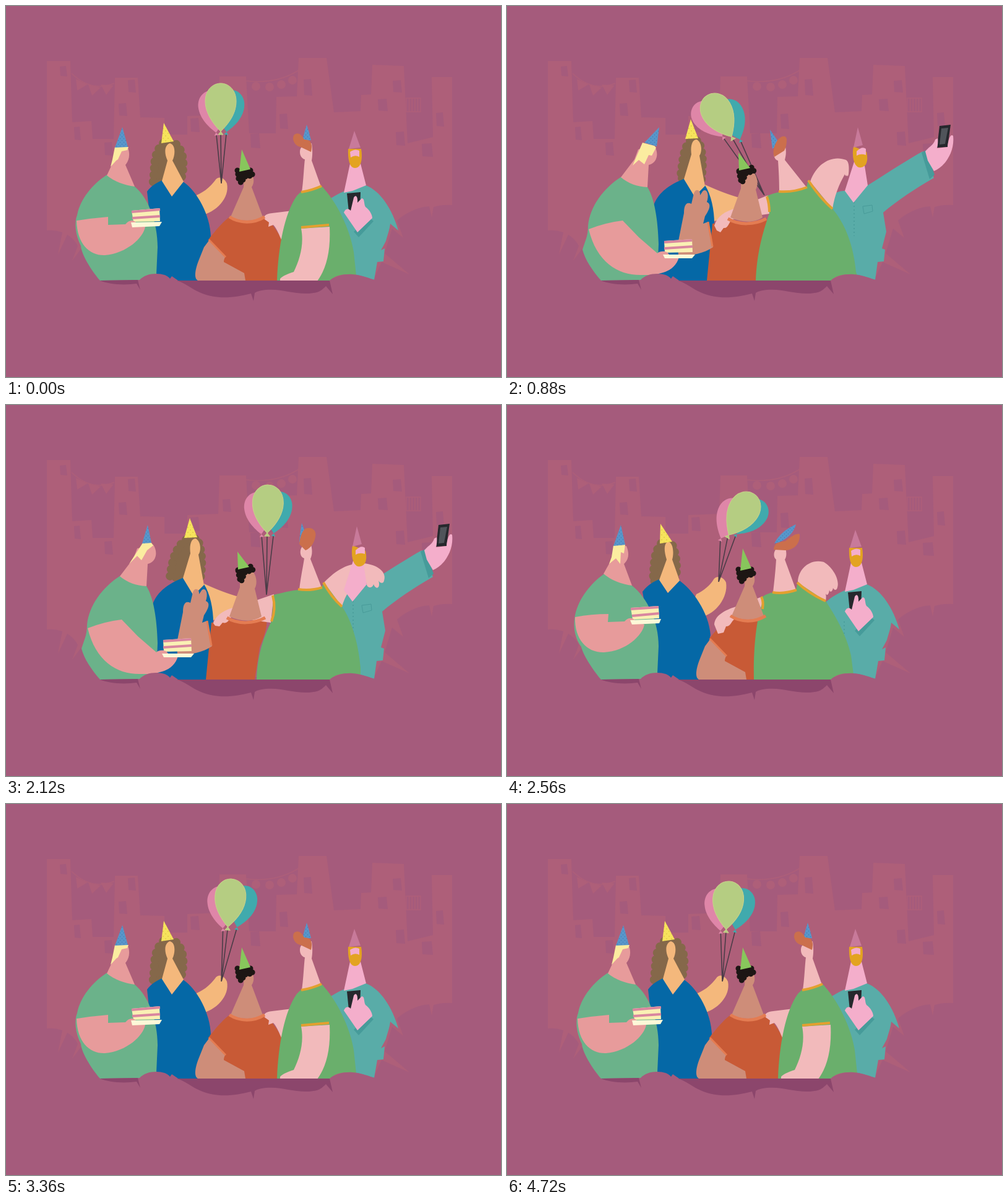
Write an HTML page that moves like this. It is 800x600 px and loops after 4760 ms.

```html
<!DOCTYPE html>
<html lang="en">
<head>
<meta charset="utf-8">
<title>Party selfie</title>
<style>
html,body{margin:0;width:100%;height:100%;overflow:hidden;background:#a55b7c}
svg{display:block;width:100%;height:100%}
</style>
</head>
<body>
<svg id="stage" viewBox="0 0 800 600">
<defs>
<pattern id="blueDots" width="6" height="6" patternUnits="userSpaceOnUse"><rect width="6" height="6" fill="#5896ca"/><circle cx="1.5" cy="1.5" r=".7" fill="#3c78b2"/><circle cx="4.5" cy="4.5" r=".7" fill="#3c78b2"/></pattern>
<pattern id="goldDots" width="8" height="8" patternUnits="userSpaceOnUse"><rect width="8" height="8" fill="#f6e35c"/><circle cx="2" cy="2" r=".8" fill="#d8b93c"/><circle cx="6" cy="6" r=".8" fill="#d8b93c"/></pattern>
</defs>
<rect width="800" height="600" fill="#a55b7c"/>
<g id="city"></g>
<g id="cast"></g>
<path fill="#a55b7c" d="M216 444C222 436 232 433 243 433C255 433 262 437 265 441L268 437L279 444.5L523 445C535 435 550 433 560 434C575 435 588 441 596 443L596 480L216 480Z"/>
<path fill="#8c466c" d="M152 444L213 443L217 459L211 449C190 452 165 450 152 444ZM276 444L523 444L528 466L517 453C510 460 505 465 485 465C460 465 445 457 420 459C410 460 405 462 402 464L400 477L396 465C370 472 340 475 315 464C300 458 290 448 276 444Z"/>
</svg>
<script>
const LOOP = 4760, STEP = 40;
const BG = '#a55b7c', WALL = '#ae5f79';
const $ = id => document.getElementById(id);

function add(parent, tag, attrs) {
  const el = document.createElementNS('http://www.w3.org/2000/svg', tag);
  for (const k in attrs) el.setAttribute(k, attrs[k]);
  return parent.appendChild(el);
}

function drawCity() {
  const g = $('city');
  add(g, 'path', {fill: WALL, d: 'M66 89L104 89L107 188L138 186L140 215L174 215L176 116L213 116L217 180L256 181L256 208L293 208L293 178L343 176L345 114L388 114L393 206L436 206L437 147L470 146L473 84L518 84L530 172L573 170L574 144L590 143L592 95L643 97L649 222L690 212L688 115L721 115L721 322C710 321 700 322 691 325L688 342L684 324C665 325 645 335 632 347L642 375L624 360L612 400L652 434L607 414L595 440L150 440L121 393L107 412L116 388C112 380 105 373 99 370L84 402L91 366C82 363 75 362 66 363Z'});
  const windows = [[87,97,12,17],[197,119,13,21],[182,157,14,21],[110,195,11,22],[159,220,14,22],
    [298,181,15,23],[350,152,14,21],[395,206,16,24],[442,174,14,25],[481,118,14,27],
    [601,150,16,20],[625,120,15,20],[630,203,15,23],[695,172,13,23],[672,222,18,22]];
  for (const [x, y, w, h] of windows)
    add(g, 'path', {fill: BG, d: `M${x} ${y + 1}l${w - 2} -1l2 ${h}l${-w + 1} -1Z`});
  const line = {fill: 'none', stroke: WALL, 'stroke-width': 1.5};
  add(g, 'path', {...line, d: 'M106 109Q138 140 175 125M388 121Q436 127 473 104'});
  for (const [x, y, r] of [[113,118,12],[133,127,0],[153,127,-10]])
    add(g, 'path', {fill: WALL, d: `M${x} ${y}l20 5l-14 13Z`, transform: `rotate(${r} ${x} ${y})`});
  for (const [x, y] of [[404,130],[426,131],[445,127],[463,120]])
    add(g, 'circle', {cx: x, cy: y, r: 7, fill: WALL});
  let rails = 'M646 149H671M646 171H671';
  for (let x = 647; x < 672; x += 4.6) rails += `M${x} 149V171`;
  add(g, 'path', {...line, d: rails});
}

const trim = (c, w) => ({stroke: c, 'stroke-width': w});
const curls = (c, w, gap) => ({...trim(c, w), 'stroke-linecap': 'round', 'stroke-linejoin': 'round', 'stroke-dasharray': `0 ${gap}`});
const GOLD = trim('#e3a02f', 4), RUST = '#e47c52', PINK = '#f4aecb';

// A pose is a letter, or a blend from A (0) to B (1).
const leanKeys = [[0,0],[80,0],[220,'D'],[540,1.07],[880,'C'],[1280,1],[2200,1],[2500,'D'],[2600,'D'],[2960,0],[LOOP,0]];
const brownKeys = [[0,0],[220,0],[560,1],[2200,1],[2500,0],[LOOP,0]];
const beardKeys = [[0,0],[180,0],[540,1],[2200,1],[2500,0],[LOOP,0]];
const greenKeys = [[0,'A'],[200,'A'],[600,'C'],[900,'C'],[1320,'B'],[2200,'B'],[2520,'D'],[2620,'D'],[3080,'A'],[LOOP,'A']];

// Each part: fill, poses, extra attributes.
const shirt = [
  ['#59aca8', {A:'M516 318C530 306 545 300 551 298L581 290C605 298 625 330 634 363L621 352C620 362 616 372 614 380L612 384L606 395L612 392L610 413L600 414L595 443C570 434 560 434 550 434L525 360Z',
    B:'M526 305C534 300 540 299 546 299L583 290C615 270 645 250 672 235L690 278C660 295 630 315 608 334L613 365L606 392L611 394L609 413L599 414L595 443C570 434 560 434 550 434L526 345Z'}],
  ['none', {A:'M545 350L545 390', B:'M561 317L561 372'}, {...trim('#3f918f', 1), 'stroke-dasharray': '2 4'}],
  ['none', {A:'M546 380L546 380L546 380L546 380Z', B:'M575 324L590 322L591 332L577 336Z'}, trim('#489b99', 1)]
];
const girl = [
  ['#f4b87c', {A:'M308 306C322 300 332 290 338 282C342 275 352 276 357 287C362 310 340 334 314 339L300 320Z',
    B:'M320 289C335 296 350 302 372 309C384 310 388 318 384 330C375 345 350 345 334 348L318 320Z',
    D:'M306 306C318 300 328 292 334 282C338 276 349 276 354 287C358 312 336 338 316 342L300 320Z'}],
  ...['', 1].map(dotted => ['#85684a', {A:'M254 222C236 240 242 260 237 290L252 284L284 276C290 250 284 230 274 223Z',
    B:'M291 218C273 230 268 255 265 278L288 280L314 282C318 255 317 235 309 216Z',
    C:'M296 218C283 232 284 260 280 278L290 280L314 282C317 255 317 240 310 218Z',
    D:'M249 224C236 240 238 262 236 285L250 284L273 280C276 255 272 236 266 224Z'}, dotted ? curls('#85684a', 14, 11) : {}]),
  ['#0568a6', {A:'M243 440L228 300C235 290 245 285 252 282L268 308L286 284C310 300 330 340 331 372L310 444L262 444Z',
    B:'M240 440L237 322C245 300 265 288 287 279L303 308L320 290C330 305 335 330 335 352L325 444L262 444Z',
    D:'M243 440L219 302C228 290 238 285 246 282L260 304L276 282C300 298 326 335 329 372L310 444L262 444Z'}],
  ['#f4b87c', {A:'M252 283L261 250C254 234 258 224 265 222C274 224 274 240 269 250L287 284L268 308Z',
    B:'M286 280L298 240C296 225 300 215 307 216C316 222 315 237 311 242L320 291L303 308Z',
    D:'M246 283L258 250C253 234 254 224 260 221C269 222 270 240 267 250L279 284L260 304Z'}],
  ['url(#goldDots)', {A:'M255 189L251 222L271 219Z', B:'M297 183L288 215L309 214Z', D:'M248 192L247 224L267 221Z'}]
];
const brownBody = [
  ['#c85a36', {A:'M327 378C345 355 355 345 362 341C380 350 400 350 417 341C430 350 442 370 446 378L442 444L340 444Z',
    B:'M332 352C345 350 350 347 357 345C375 354 400 352 417 343C428 348 415 380 410 392L402 444L323 444Z'}],
  ['#ce8d79', {A:'M329 378L355 405C353 408 352 410 352 414L385 432L387 444C380 444 370 444 360 444L350 444C345 444 340 444 335 444L325 444C318 444 314 444 310 444C303 440 306 425 312 410L320 390Z',
    B:'M325 349L333 390C318 400 300 404 277 404L276 385L286 335C286 322 290 316 298 320L302 303C304 295 313 296 312 306L316 300C321 294 328 302 323 317C331 320 327 330 320 340L317 352Z'}],
  ['none', {A:'M328 378L355 406', B:'M325 349L332 389'}, trim(RUST, 3)]
];
const green = [
  ['#f2babb', {A:'M463 331L430 335C420 336 415 340 418 345L425 350L424 357L432 354C438 360 442 372 446 380L452 350Z',
    B:'M433 306L372 327C352 330 338 342 335 353L338 357L345 358L350 352C358 354 360 348 364 343L428 352Z',
    C:'M422 306L370 327C352 332 340 340 335 355L339 363L345 366L350 359C358 360 358 350 364 345L424 336Z',
    D:'M412 310L370 326C352 332 336 340 335 355L341 370L350 368L354 358C362 358 362 350 368 346L413 330Z'}],
  ['#6aaf6c', {A:'M438 444C440 390 450 335 470 307L474 303C475 302 476 301 478 300L509 291L512 293L516 298C535 320 556 360 562 398L566 436C550 433 535 433 523 444Z',
    B:'M405 444C406 405 416 375 429 350L433 307C445 304 460 300 473 299L510 295L514 286L543 326C560 350 570 390 573 425L573 436C550 433 535 433 523 444Z',
    C:'M402 444C404 400 412 370 424 335L420 307C428 304 434 302 440 301L484 293L487 281L526 328C545 350 560 385 564 430L566 436C550 433 535 433 523 444Z',
    D:'M399 444C398 400 402 350 412 322L413 310C419 306 424 304 430 303L467 299L470 286L515 317C530 340 548 370 556 405L560 436C550 433 535 433 523 444Z'}],
  ['#f2babb', {A:'M523 357C525 395 518 425 503 445C490 445 470 446 443 445C443 444 443 443 443 442C443 441 443 441 444 440C446 438 452 434 465 430C475 410 482 385 477 360Z',
    B:'M514 287C535 265 555 255 578 256C600 258 616 270 611 284C610 290 604 288 602 284C606 296 598 300 594 290C592 298 582 296 583 288C570 284 552 295 543 326Z',
    C:'M490 284C500 255 525 240 548 249C553 252 553 262 552 272C551 276 550 276 549 273C549 276 548 276 547 273C547 275 546 274 546 272C536 290 530 305 526 328Z',
    D:'M470 287C470 265 490 248 512 254C526 262 538 282 534 295C533 300 529 300 527 296C526 302 522 304 521 299C520 308 516 310 514 302C516 306 516 312 515 317Z'}],
  ['#f2babb', {A:'M478 301C481 280 481 265 483 248C474 246 473 232 478 228L494 222C496 235 495 244 494 250L509 292Q495 297 478 301Z',
    B:'M474 299C476 280 480 262 482 248C474 246 474 232 480 228L493 226C496 238 494 244 492 249L510 295Q492 300 474 299Z',
    C:'M440 300C440 280 439 265 438 250C430 248 430 235 434 232L450 228C452 238 450 244 449 249L484 293Q462 301 440 300Z',
    D:'M430 303C432 285 434 268 435 250C430 246 431 238 434 234L450 230C452 240 452 245 449 250L467 299Q450 306 430 303Z'}],
  ['none', {A:'M477 301Q495 298 510 291', B:'M472 298Q492 301 511 295', C:'M439 300Q462 302 485 293', D:'M429 303Q448 306 468 299'}, GOLD],
  ['none', {A:'M477 358Q500 356 522 354', B:'M513 287Q525 310 543 326', C:'M487 282Q505 310 526 328', D:'M469 287Q488 305 515 317'}, GOLD],
  ['none', {A:'M472 306Q472 306 472 306', B:'M431 308Q437 330 429 350', C:'M420 308Q424 320 424 333', D:'M411 310Q415 318 413 330'}, GOLD],
  ['url(#blueDots)', {A:'M486 192Q482 205 479 217L493 217Q490 204 486 192Z', B:'M478 191Q475 207 474 222L486 214Q482 202 478 191Z',
    C:'M425 200Q427 216 429 231L440 222Q433 211 425 200Z', D:'M467 193Q442 204 432 224L440 222Q462 212 467 193Z'}],
  ['#cb6f4c', {A:'M476 228C466 226 461 214 466 208C474 202 480 212 482 216C493 215 496 224 493 236Z',
    B:'M474 225C476 210 480 199 488 199C498 198 502 206 500 213C498 224 492 232 484 235Z',
    C:'M432 244C428 235 433 222 438 216C445 208 452 210 452 216C452 225 450 230 448 234Z',
    D:'M431 234C432 222 440 222 450 220C460 212 468 207 473 209C474 220 468 234 450 235Z'}]
];
const brownHead = [
  ['#ce8d79', {A:'M385 273L384 293L363 341C380 349 400 349 415 341L397 293C402 286 401 276 396 271Z',
    B:'M378 272L378 295L361 342C380 351 400 351 413 342L402 297C407 288 405 274 396 266Z'}],
  ['none', {A:'M361 341C378 352 400 352 418 341', B:'M357 344C375 355 400 354 419 344'}, trim(RUST, 5)],
  ...['', 1].map(dotted => ['#1d1614', {A:'M374 266L395 266L399 274L386 276L380 286L376 280Z',
    B:'M375 267L396 261L399 267L386 271L380 286L377 280Z'}, dotted ? curls('#1d1614', 9, 7) : {}]),
  ['#88c65c', {A:'M381 232L377 268L395 264Z', B:'M374 237L375 266L393 262Z'}]
];
const beardFront = [
  ['#469b9a', {A:'M562 365L570 374L594 348L586 342Z', B:'M670 237L678 233L691 273L683 280Z'}],
  ['#26282d', {A:'M551 303L573 301L572 330L554 333Z', B:'M699 194L717 192L712 228L695 229Z'}],
  ['#50545a', {A:'M562 316L562 316L562 316L562 316Z', B:'M702 198L713 197L708 223L699 224Z'}],
  [PINK, {A:'M546 334C548 328 553 326 557 331L562 310C565 304 569 308 568 318L575 311C580 311 578 320 581 325C588 330 592 338 592 343L568 366Z',
    B:'M676 235C684 226 690 224 692 216L696 214C697 220 696 226 695 230L712 228C713 215 717 206 721 210C724 235 708 260 690 267L680 250Z'}],
  [PINK, {A:'M556 232L556 255L546 302L560 299L582 290L573 255L573 232Z', B:'M562 230L561 252L546 299L560 318L583 290L577 252L578 232Z'}],
  ['#e3a321', {A:'M553 231C552 250 556 262 564 262C573 262 577 250 574 231Z', B:'M560 227C556 250 564 263 572 261C582 260 584 248 581 236Z'}],
  [PINK, {A:'M556 236Q564 230 571 234L571 244Q564 240 557 245Z', B:'M565 235Q574 226 580 231L580 241Q572 238 565 242Z'}],
  ['#c87a9a', {A:'M563 202L554 231L573 229Z', B:'M567 196L560 229L575 225Z'}]
];
const baker = [
  ['#6bb28a', {A:'M152 444C138 428 122 402 121 388C112 370 110 350 115 338C120 312 140 288 163 273L208 292C230 310 245 350 245 390L243 434C235 433 222 436 216 443Z',
    B:'M152 444C138 428 126 410 122 394C127 378 131 372 131 355C134 325 155 295 185 276L227 293C238 310 244 345 245 385L243 434C235 433 222 436 216 443Z',
    D:'M152 444C138 428 122 402 120 391C108 375 107 355 110 340C116 312 136 288 157 273L202 292C227 312 245 350 245 390L243 434C235 433 222 436 216 443Z'}],
  ['#e79b9b', {A:'M163 274L176 246L178 230L197 229C201 240 199 250 193 257L208 292C192 290 175 284 163 274Z',
    B:'M184 277L206 248L212 232L238 226C246 238 243 254 229 257L227 293C210 292 196 287 184 277Z',
    D:'M156 273L171 246L174 230L193 228C198 240 197 250 189 257L202 292C185 290 168 283 156 273Z'}],
  ['#fbeca0', {A:'M176 228L198 228L196 233L187 235L181 248L178 250L169 260L172 248Z',
    B:'M221 223L235 223L238 227L228 235L219 251L212 244L199 257L210 240Z',
    C:'M219 221L238 226L241 229L234 242L229 241L222 256L213 249L203 258Z',
    D:'M172 227L191 226L189 240L184 238L183 257L176 248L165 257L169 246Z'}],
  ['url(#blueDots)', {A:'M188 196L176 229L197 228Z', B:'M229 194L220 224L235 223Z', C:'M246 196L222 221L242 227Z', D:'M184 194L172 228L191 226Z'}],
  ['#faf0b4', {A:'M203 331L248 327L249 348L206 349Z', B:'M254 380L299 377L300 398L255 399Z', D:'M200 328L245 325L246 345L203 347Z'}],
  ['none', {A:'M203 333L249 329M204 343L249 340', B:'M254 382L299 379M254 392L300 389', D:'M200 330L245 327M202 341L246 337'}, trim('#d9869f', 4)],
  ['#e79b9b', {A:'M115 347Q140 343 165 341L165 354L193 353C198 346 206 345 210 350L225 357C222 375 195 400 160 403C135 404 115 385 114 347Z',
    B:'M132 361Q160 350 187 347L213 374L243 400C248 395 260 396 262 402L278 406C272 428 250 436 218 435C180 436 145 415 132 361Z',
    D:'M110 343Q136 338 164 338L163 351L190 350C195 344 202 343 207 348L222 355C219 373 192 398 157 400C130 401 109 380 110 343Z'}],
  ['#fdf8d8', {A:'M202 350L252 349L248 356L204 358Z', B:'M252 402L304 402L299 408L255 408Z', D:'M199 348L249 346L246 353L202 355Z'}]
];

// time, hand x y, middle balloon x y, tilt, offsets of the outer two
const balloonKeys = [
  [0,348,287,347,163,0,-13,15],[220,341,286,338,168,-4,-14,17],[560,416,306,352,180,-34,-17,20],
  [880,416,306,343,177,-30,-17,21],[1240,421,307,452,166,20,-18,12],[1480,421,307,433,175,11,-18,8],
  [1820,421,307,416,168,-3,-15,16],[2200,421,307,424,167,2,-15,16],[2560,342,286,379,176,31,-20,15],
  [2900,348,287,332,151,-8,-15,16],[3360,348,287,362,159,5,-14,20],[3760,348,287,354,158,2,-14,18],
  [4160,348,287,362,159,5,-14,20],[4720,348,287,357,163,4,-15,20],[LOOP,348,287,347,163,0,-13,15]
];
const EGG = 'M0 40C-12 28 -25 10 -25 -9C-25 -28 -12 -38 0 -38C12 -38 25 -28 25 -9C25 12 12 28 0 40L-4 45L4 45Z';

const ease = u => u * u * (3 - 2 * u);
const nums = d => d.match(/-?[\d.]+/g).map(Number);
const mix = (a, b, u) => a.map((v, i) => v + (b[i] - v) * u);

function span(keys, t) {
  let i = 0;
  while (i < keys.length - 2 && t >= keys[i + 1][0]) i++;
  const a = keys[i], b = keys[i + 1];
  return [a, b, ease((t - a[0]) / (b[0] - a[0]))];
}

function makeActor(parts, keys) {
  const g = add($('cast'), 'g', {});
  const list = parts.map(([fill, poses, extra]) => {
    const shape = {el: add(g, 'path', {fill, ...extra}), marks: poses.A.split(/-?[\d.]+/), poses: {}};
    for (const k in poses) shape.poses[k] = nums(poses[k]);
    return shape;
  });
  const pose = (p, k) => typeof k === 'number' ? mix(p.A, p.B, k) : p[k] || p.B;
  return t => {
    const [a, b, u] = span(keys, t);
    for (const {el, marks, poses} of list) {
      const v = mix(pose(poses, a[1]), pose(poses, b[1]), u);
      el.setAttribute('d', marks.map((m, i) => i ? ' ' + v[i - 1].toFixed(2) + m : m).join(''));
    }
  };
}

function makeBalloons() {
  const g = add($('cast'), 'g', {});
  const strings = add(g, 'path', {fill: 'none', stroke: '#4b3d48', 'stroke-width': 1.6});
  const eggs = ['#df86a8', '#40aaad', '#b5cd82'].map(fill => add(g, 'path', {d: EGG, fill}));
  eggs[2].setAttribute('stroke', '#c9d08a');
  return t => {
    const [a, b, u] = span(balloonKeys, t);
    const [, hx, hy, x, y, tilt, left, right] = mix(a, b, u);
    let d = '';
    [[left, 7, -9, .88], [right, 6, 9, .88], [0, 0, 0, 1]].forEach(([dx, dy, turn, s], i) => {
      const r = (tilt + turn) * Math.PI / 180, len = 43 * s;
      const cx = x + dx, cy = y + dy;
      eggs[i].setAttribute('transform', `translate(${cx} ${cy}) rotate(${tilt + turn}) scale(${s})`);
      d += `M${hx} ${hy}L${cx - len * Math.sin(r)} ${cy + len * Math.cos(r)}`;
    });
    strings.setAttribute('d', d);
  };
}

drawCity();
const scene = [
  makeActor(shirt, beardKeys),
  makeActor(girl, leanKeys),
  makeBalloons(),
  makeActor(brownBody, brownKeys),
  makeActor(green, greenKeys),
  makeActor(brownHead, brownKeys),
  makeActor(beardFront, beardKeys),
  makeActor(baker, leanKeys)
];

let start = null;
function frame(now) {
  if (start === null) start = now;
  const t = Math.floor(((now - start) % LOOP) / STEP) * STEP;
  scene.forEach(draw => draw(t));
  requestAnimationFrame(frame);
}
scene.forEach(draw => draw(0));
requestAnimationFrame(frame);
</script>
</body>
</html>
```
